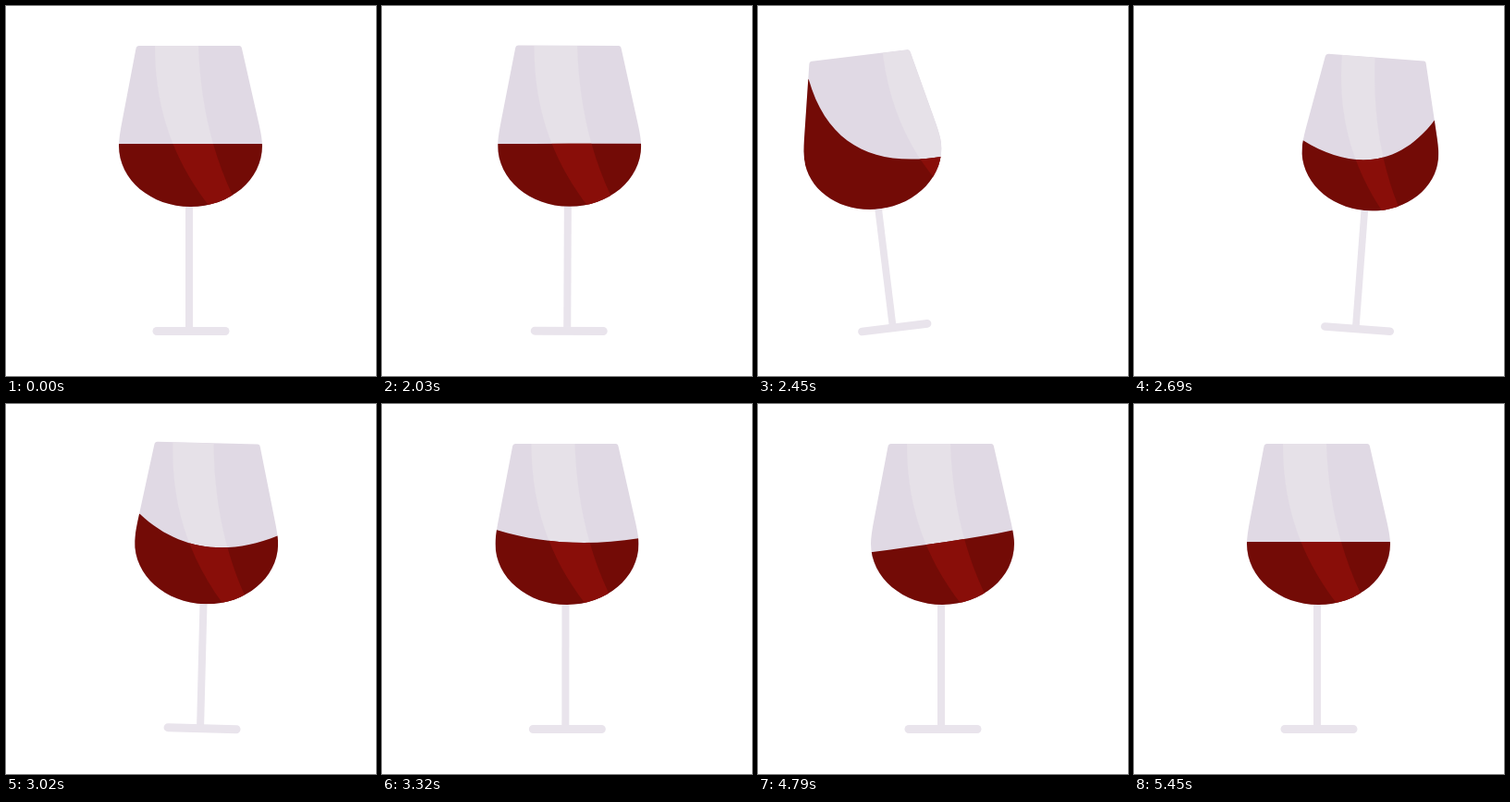
An HTML page for the animation above (5480 ms loop, 400 px wide and 400 px high).

```html
<!DOCTYPE html>
<html lang="en">
<head>
<meta charset="utf-8">
<title>Wine glass</title>
<style>
  html, body { margin: 0; width: 100%; height: 100%; overflow: hidden; background: #fff; }
  svg { display: block; width: 100%; height: 100%; }
</style>
</head>
<body>
<svg viewBox="0 0 400 400">
  <defs>
    <path id="bowl" d="M144 43H252Q254.5 43 255 46L274 130Q277 144 277 151C277 188 242 217 199.5 217C157 217 122 188 122 151Q122 144 124.5 130L140.5 46Q141 43 144 43Z"/>
    <clipPath id="inBowl"><use href="#bowl"/></clipPath>
    <clipPath id="inWine"><path id="level"/></clipPath>
  </defs>
  <g id="glass">
    <path d="M198 214V350" stroke="#e9e4ec" stroke-width="8"/>
    <path d="M163 351.5H237" stroke="#e9e4ec" stroke-width="9" stroke-linecap="round"/>
    <use href="#bowl" fill="#e0d9e4"/>
    <g clip-path="url(#inBowl)">
      <path class="shine" fill="#e6e1e8"/>
      <g clip-path="url(#inWine)">
        <rect x="100" y="20" width="200" height="210" fill="#730b06"/>
        <path class="shine" fill="#890e09"/>
      </g>
    </g>
  </g>
</svg>
<script>
const LOOP = 5480, START = 2030, STEP = 30;
const REACH = 80.5, LEVEL = 149;

const glass = document.getElementById("glass");
const level = document.getElementById("level");
const shines = document.querySelectorAll(".shine");

// eased 0 to 1 while v goes from a to b
function ease(a, b, v) {
  const u = Math.min(1, Math.max(0, (v - a) / (b - a)));
  return u * u * (3 - 2 * u);
}

// small swing before the orbit and a dying one after it
function nudge(t) {
  if (t > 2000 && t < 2200) return 7 * Math.sin(Math.PI * (t - 2000) / 200);
  const s = t - 3040;
  return s > 0 ? -7 * Math.exp(-s / 160) * Math.sin(2 * Math.PI * s / 300) : 0;
}

function moveGlass(t) {
  const turn = 2 * Math.PI * ease(2060, 3140, t);
  const x = nudge(t) - REACH * Math.sin(turn);
  const depth = ease(-0.9, 0.7, -Math.cos(turn));
  const tilt = 0.085 * x - 0.5 * depth;
  glass.setAttribute("transform",
    `translate(${200 + 0.7 * x + 2 * depth} ${351.5 - 0.55 * Math.abs(tilt)}) ` +
    `rotate(${tilt}) scale(${1 - 0.046 * depth}) translate(-200 -351.5)`);
  return x;
}

function moveShine(x) {
  const l = x < 0 ? -0.82 * x : -0.03 * x;
  const r = x < 0 ? -0.82 * x : -0.2 * x;
  const d = `M${161 + l} 43C${161 + l} 100 ${175 + l} 160 ${221 + l} 218` +
    `L${251 + r} 218L${246 + r} 207C${221 + r} 155 ${210 + r} 100 ${208 + r} 43Z`;
  shines.forEach(s => s.setAttribute("d", d));
}

// a damped slosh from side to side; the swirl lifts both rims and sinks the middle
function moveWine(t) {
  const decay = 14 + 41 * Math.exp(-Math.max(0, t - 2825) / 600);
  const size = decay * ease(2000, 2380, t) * (1 - ease(4900, 5440, t));
  const slosh = size * Math.cos(2 * Math.PI * (t - 2825) / 680);
  const swirl = ease(2060, 2400, t) * (1 - ease(2700, 3760, t));
  const lift = 22 * swirl + 0.0045 * slosh * slosh;
  const sink = 0.052 * lift * lift * Math.max(0, 1 - 0.017 * Math.abs(slosh));

  const inset = y => Math.max(0, 146 - y) * 0.19;
  const left = LEVEL - lift + slosh, right = LEVEL - lift - slosh;
  const mid = LEVEL + sink, bend = 0.27 * slosh, shift = 0.45 * slosh;
  level.setAttribute("d", `M100 ${left}H${122 + inset(left)}` +
    `C${174 + shift} ${mid + bend} ${226 + shift} ${mid - bend} ` +
    `${277 - inset(right)} ${right}H300V230H100Z`);
}

function tick() {
  const now = performance.now() % LOOP;
  const t = now < START ? 0 : START + Math.floor((now - START) / STEP) * STEP;
  moveShine(moveGlass(t));
  moveWine(t);
  requestAnimationFrame(tick);
}
tick();
</script>
</body>
</html>
```
